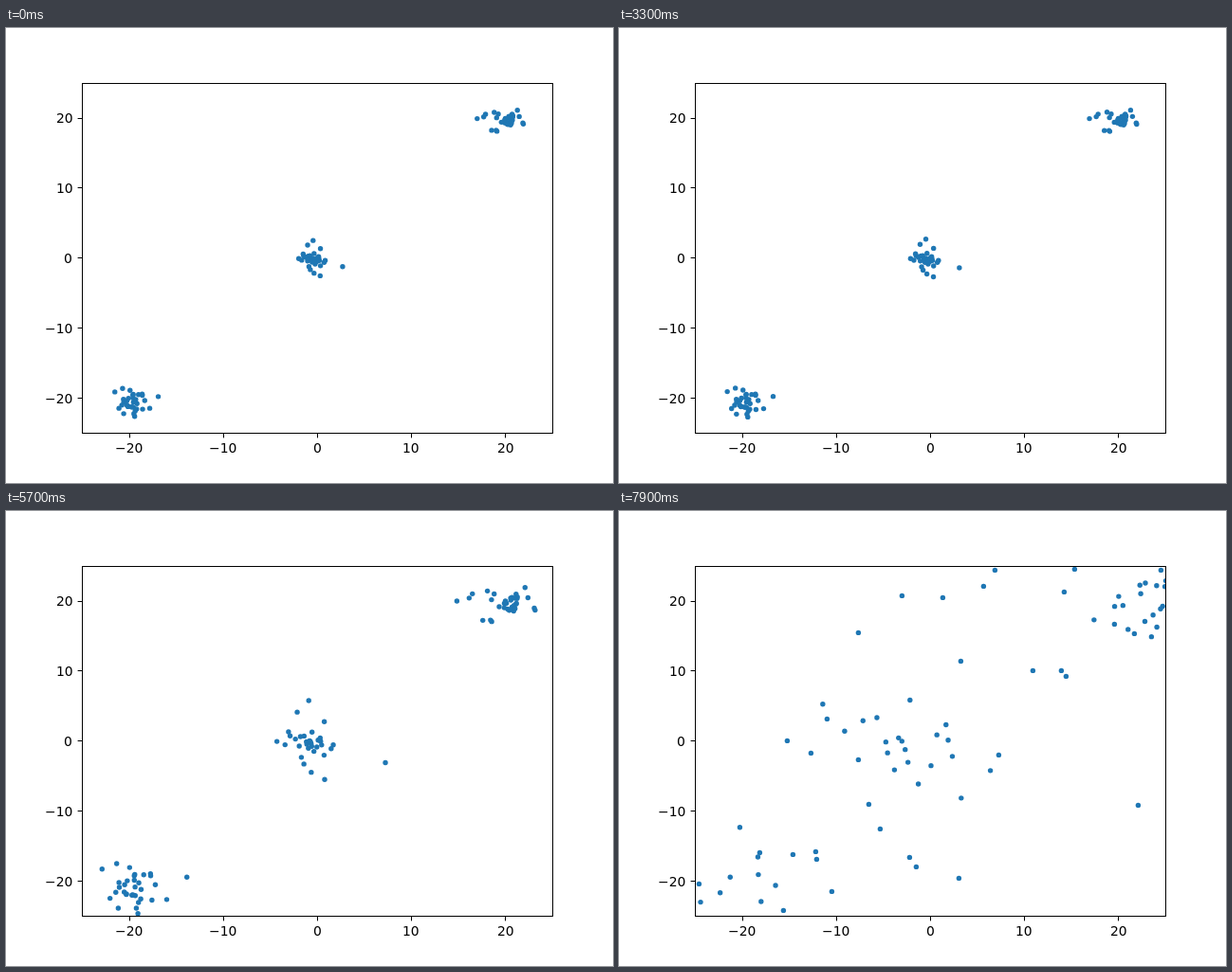
These frames come from a looping animation (640x480 px, 8 s). An HTML page:

```html
<!DOCTYPE html>
<html lang="en">
<head>
<meta charset="utf-8">
<title>Spreading clusters</title>
<style>
html, body { margin: 0; width: 100%; height: 100%; overflow: hidden; background: #fff; }
svg { display: block; width: 640px; height: 480px; }
text { font: 13.89px "DejaVu Sans", sans-serif; fill: #000; }
.line { fill: none; stroke: #000; stroke-width: 1; }
#dots { fill: #1f77b4; }
</style>
</head>
<body>
<svg viewBox="0 0 640 480">
  <clipPath id="plot"><rect x="80" y="58" width="496.5" height="369.5"/></clipPath>
  <g id="dots" clip-path="url(#plot)"></g>
  <rect class="line" x="80.5" y="58.5" width="496" height="369"/>
  <g id="axes"></g>
</svg>
<script>
const LOOP = 8000, LAST = 7900, STEP = 200;
const DIGIT = 8.84, MINUS = 11.64;

// A cluster grows from a tight copy of its final shape: a few far dots
// are placed by hand, the crowd is scattered around a mean.
const clusters = [
  {
    home: [327, 243], tight: 0.125, haste: 90,
    far: [[298, 89], [252, 128], [360, 158], [219, 219], [177, 242], [202, 255], [400, 257],
      [252, 262], [263, 309], [275, 335], [306, 365], [358, 387], [547, 310]],
    crowd: { mean: [303, 245], spread: [38, 32] }
  },
  {
    home: [526, 96], tight: 0.16, haste: 200,
    far: [[341, 91], [384, 79], [396, 62], [436, 168], [466, 168], [471, 174], [480, 61],
      [469, 85], [522, 119], [543, 129], [571, 62], [606, 36], [645, 127]],
    crowd: { mean: [548, 96], spread: [38, 18] }
  },
  {
    home: [131, 391], tight: 0.16, haste: 90,
    far: [[78, 321], [27, 344], [54, 452], [84, 393], [148, 360], [173, 421], [183, 362],
      [207, 359], [208, 367], [224, 401], [257, 452], [210, 458], [313, 375]],
    crowd: { mean: [128, 418], spread: [28, 36] }
  }
];
const CROWD = 20;

let seed = 7;
const random = () => (seed = (seed * 16807) % 2147483647) / 2147483647;
const bell = () => 2 * (random() + random() + random() - 1.5);

const add = (parent, tag, attrs, label) => {
  const el = document.createElementNS("http://www.w3.org/2000/svg", tag);
  for (const name in attrs) el.setAttribute(name, attrs[name]);
  if (label) el.textContent = label;
  return parent.appendChild(el);
};

const axes = document.getElementById("axes");
for (let v = -20; v <= 20; v += 10) {
  const digits = String(Math.abs(v));
  const width = digits.length * DIGIT + (v < 0 ? MINUS : 0);
  const label = (v < 0 ? "\u2212" : "") + digits;
  const x = 328 + 9.92 * v, y = 242.4 - 7.392 * v;
  const px = Math.round(x) + 0.5, py = Math.round(y) + 0.5;
  add(axes, "path", { class: "line", d: `M${px} 427.5v4.9M80.5 ${py}h-4.9` });
  add(axes, "text", { x: Math.round(x - width / 2), y: 448 }, label);
  add(axes, "text", { x: Math.round(70.3 - width), y: Math.round(y + 5.28) }, label);
}

const group = document.getElementById("dots");
const dots = clusters.flatMap(({ home, tight, haste, far, crowd }) => {
  const scattered = Array.from({ length: CROWD }, () =>
    crowd.mean.map((m, i) => m + crowd.spread[i] * bell()));
  return [...far, ...scattered].map(end => {
    const reach = end.map((e, i) => e - home[i]);
    return {
      home, reach, tight,
      power: 7 - Math.hypot(...reach) / haste,
      el: add(group, "circle", { r: 2.7 })
    };
  });
});

function draw(ms) {
  const t = Math.floor((ms - 100) / STEP) * STEP + 100;
  const u = t < 500 ? 0 : t / LAST;
  for (const { home, reach, tight, power, el } of dots) {
    const size = tight + (1 - tight) * u ** power;
    el.setAttribute("cx", home[0] + 0.4 + reach[0] * size);
    el.setAttribute("cy", home[1] + 0.4 + reach[1] * size);
  }
}

const start = performance.now();
function tick() {
  draw((performance.now() - start) % LOOP);
  requestAnimationFrame(tick);
}
tick();
</script>
</body>
</html>
```
